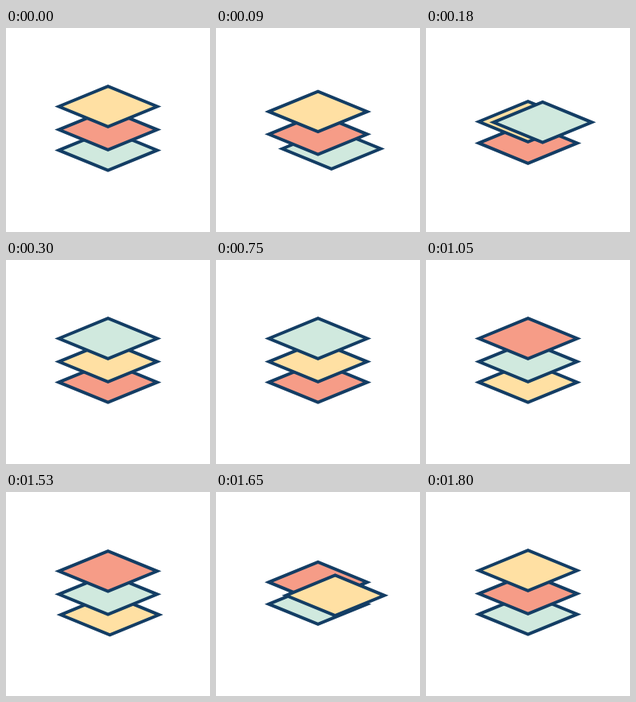
Write an HTML page that moves like this. It is 256x256 px and loops after 2250 ms.

```html
<!DOCTYPE html>
<html lang="en">
<head>
<meta charset="utf-8">
<title>Layers</title>
<style>
  html, body { margin: 0; width: 100%; height: 100%; overflow: hidden; background: #fff; }
  svg { display: block; width: 100vw; height: 100vh; }
  .sheet { stroke: #133d64; stroke-width: 4; stroke-linejoin: miter; stroke-miterlimit: 10; }
</style>
</head>
<body>
<svg viewBox="0 0 256 256">
  <path id="arc" d="M128 153.4C164 164.4 150 102.4 128 98.5" fill="none"/>
  <g id="stack"></g>
</svg>
<script>
  const CYCLE = 750, MOVE = 300, LOOP = 3 * CYCLE;
  const LEVELS = [98.5, 127.6, 153.4];          // top, middle, bottom
  const COLORS = ['#ffe0a3', '#f69c87', '#d0e9de'];
  const stack = document.getElementById('stack');
  const arc = document.getElementById('arc');
  const arcLength = arc.getTotalLength();

  const sheets = COLORS.map(color => {
    const el = document.createElementNS('http://www.w3.org/2000/svg', 'path');
    el.setAttribute('class', 'sheet');
    el.setAttribute('d', 'M-61.7 0L0 -25.3L61.7 0L0 25.3Z');
    el.setAttribute('fill', color);
    return el;
  });

  const ease = t => t * t * (3 - 2 * t);
  const place = (el, x, y) => el.setAttribute('transform', `translate(${x} ${y})`);
  let drawnOrder = '';

  function reorder(order) {
    const key = order.join();
    if (key === drawnOrder) return;
    drawnOrder = key;
    order.forEach(i => stack.appendChild(sheets[i]));
  }

  function draw(ms) {
    const turn = Math.floor(ms / CYCLE);
    const t = Math.min(1, (ms % CYCLE) / MOVE);
    const p = ease(t);
    const [top, mid, low] = [0, 1, 2].map(n => (n + 3 - turn) % 3);

    place(sheets[top], 128, LEVELS[0] + (LEVELS[1] - LEVELS[0]) * p);
    place(sheets[mid], 128, LEVELS[1] + (LEVELS[2] - LEVELS[1]) * p);
    const spot = arc.getPointAtLength(arcLength * p);
    place(sheets[low], spot.x, spot.y);

    // The lifted sheet passes in front halfway up.
    reorder(t < 0.5 ? [low, mid, top] : [mid, top, low]);
  }

  const start = performance.now();
  function tick() {
    draw((performance.now() - start) % LOOP);
    requestAnimationFrame(tick);
  }
  draw(0);
  requestAnimationFrame(tick);
</script>
</body>
</html>
```
